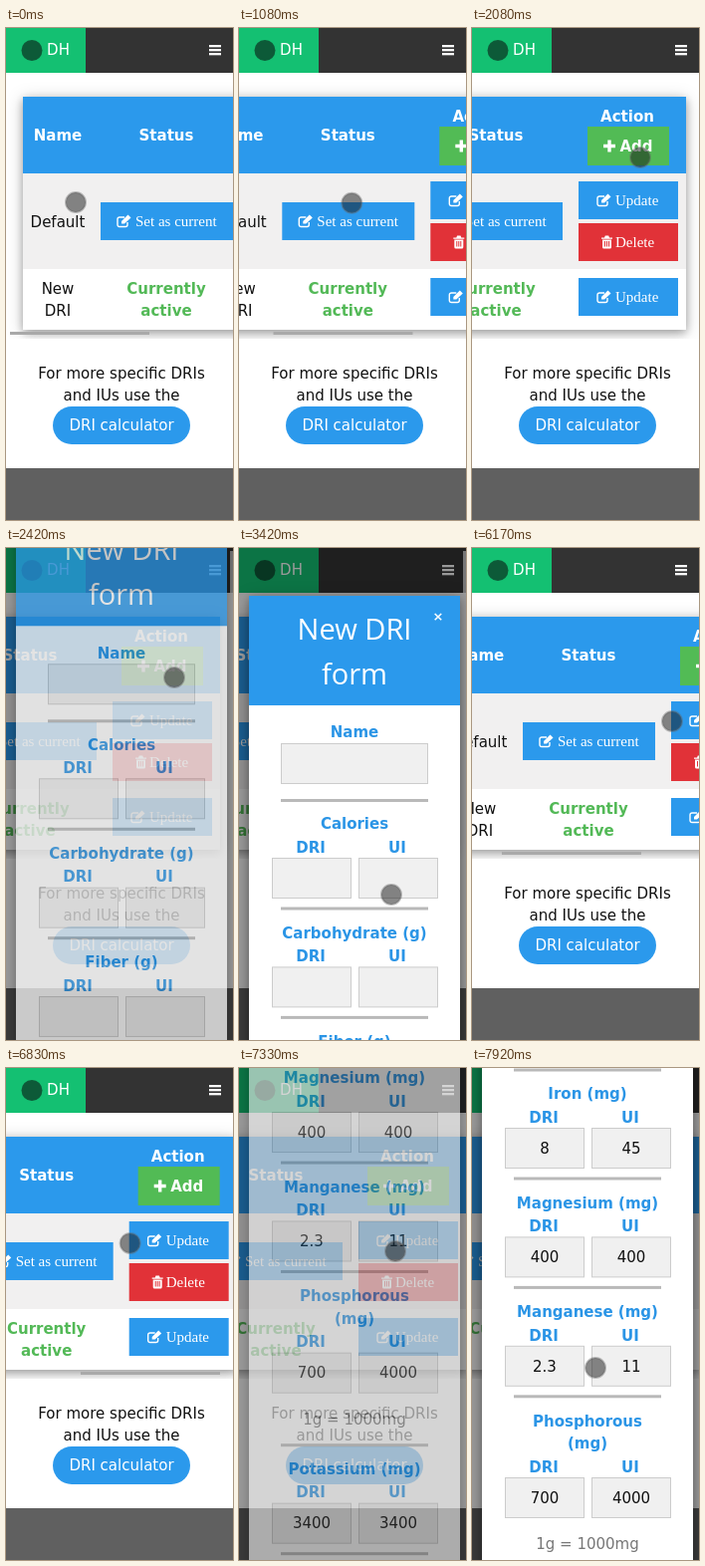
An HTML page for the animation above (8 s loop, 228x494 px).

```html
<!DOCTYPE html>
<html lang="en">
<head>
<meta charset="utf-8">
<title>DRI table</title>
<style>
  html, body { margin: 0; width: 100%; height: 100%; overflow: hidden; background: #fff; }
  svg { display: block; width: 100vw; height: 100vh; }
  text { font: 15px "DejaVu Sans", sans-serif; fill: #111; text-anchor: middle; }
  .bold { font-weight: bold; }
  .white { fill: #fff; }
  .blue { fill: #2b95e6; }
  .green { fill: #53b957; }
  .gray { fill: #777; }
  .button { font-family: "Liberation Serif", serif; fill: #fff; text-anchor: start; }
  .heading { font: 29px "Open Sans", sans-serif; fill: #fff; }
  .close { font-size: 13px; font-weight: bold; fill: #fff; }
  .card { filter: drop-shadow(0 3px 4px rgba(0,0,0,.28)) drop-shadow(0 2px 8px rgba(0,0,0,.2)); }
</style>
</head>
<body>
<svg id="stage" viewBox="0 0 228 494" preserveAspectRatio="none"></svg>
<script>
const BLUE = '#2b99ec', GREEN = '#52bb55', RED = '#e13238';

// Markup helpers; text is placed by its vertical centre.
const box = (x, y, w, h, fill, extra = '') =>
  `<rect x="${x}" y="${y}" width="${w}" height="${h}" fill="${fill}" ${extra}/>`;
const text = (x, y, str, cls = '', drop = 5.3) =>
  `<text x="${x}" y="${y + drop}" class="${cls}">${str}</text>`;
const at = (x, y, inner) => `<g transform="translate(${x} ${y})">${inner}</g>`;

const editIcon = `<path d="M11 7.5V10a2 2 0 0 1-2 2H3a2 2 0 0 1-2-2V4.500a2 2 0 0 1 2-2H8"
  fill="none" stroke="#fff" stroke-width="1.4"/><path d="M5 9V6.500L11.500 0 14.500 3 8 9Z" fill="#fff"/>`;
const trashIcon = `<path d="M0 2h3l.8-2h3.400l.8 2h3v1.300H0ZM1 4h9v7.500q0 1.500-1.500 1.500h-6Q1 13 1 11.500Z" fill="#fff"/>
  <path d="M3.500 5.500v5.500M5.500 5.500v5.500M7.500 5.500v5.500" stroke="${RED}"/>`;
const plusIcon = '<path d="M6 0v12M0 6h12" stroke="#fff" stroke-width="3.4"/>';

const button = (x, y, w, label, icon, fill, labelX, iconX) =>
  box(x, y, w, 38, fill) + at(iconX, y + 12.5, icon) + text(labelX, y + 19, label, 'button');
const updateButton = y => button(244, y, 100, 'Update', editIcon, BLUE, 281, 262);

const table =
  box(17, 69, 335, 234, '#fff', 'class="card"') +
  box(17, 69, 335, 77, BLUE) + box(17, 146, 335, 96, '#f1f0f0') +
  text(52, 108, 'Name', 'bold white') + text(161, 108, 'Status', 'bold white') +
  text(293, 89, 'Action', 'bold white') +
  box(253, 99, 82, 39, GREEN) + at(269, 112.5, plusIcon) + text(302, 118.5, 'Add', 'bold white') +
  text(52, 195, 'Default') +
  button(95, 175, 133, 'Set as current', editIcon, BLUE, 130, 111) +
  updateButton(154) + button(244, 196, 100, 'Delete', trashIcon, RED, 281, 267) +
  text(52, 262, 'New') + text(52, 284, 'DRI') +
  text(161, 262, 'Currently', 'bold green') + text(161, 284, 'active', 'bold green') +
  updateButton(251);

const page =
  box(0, 0, 228, 494, '#fff') + box(0, 0, 228, 45, '#333') + box(0, 0, 80, 45, '#14c072') +
  '<circle cx="26" cy="22.5" r="10.5" fill="#0d5a38"/>' + text(52.5, 22, 'DH', 'white') +
  [17, 21, 25].map(y => box(204, y, 12, 2.3, '#fff')).join('') +
  `<clipPath id="view"><rect y="53" width="228" height="259"/></clipPath>
   <g clip-path="url(#view)"><g id="table">${table}</g></g>` +
  box(4, 305, 140, 3, '#a9a9a9', 'id="thumb"') +
  text(116, 347, 'For more specific DRIs') + text(116, 369, 'and IUs use the') +
  box(47, 380, 138, 38, BLUE, 'rx="19"') + text(116, 399, 'DRI calculator', 'white') +
  box(0, 442, 228, 52, '#606060');

const rule = y => box(42, y - 1.5, 148, 3, '#b9b9b9');
const input = (x, y, w, value = '') =>
  box(x + .5, y + .5, w - 1, 40, '#f0f0f0', 'stroke="#ccc"') + text(x + w / 2, y + 20.5, value);
const nutrient = (y, title, dri, ui) =>
  text(116, y, title, 'bold blue') +
  text(72, y + 23.5, 'DRI', 'bold blue') + text(159, y + 23.5, 'UI', 'bold blue') +
  input(33, y + 34, 80, dri) + input(120, y + 34, 80, ui);
const series = (y, rows) => rows.map(([title, dri, ui], i) =>
  nutrient(y + i * 109.4, title, dri, ui) + rule(y + i * 109.4 + 85)).join('');

const newForm =
  box(10, 48, 212, 1200, '#fff', 'class="card"') + box(10, 48, 212, 110, BLUE) +
  text(116, 81, 'New DRI', 'heading', 11) + text(116, 126, 'form', 'heading', 11) +
  text(200, 68, '×', 'close', 5) +
  text(116, 185, 'Name', 'bold blue') + input(42, 196, 148) + rule(253.5) +
  series(277, [['Calories'], ['Carbohydrate (g)'], ['Fiber (g)'], ['Fat (g)'], ['Protein (g)']]);

const updateForm =
  box(10, -100, 212, 1200, '#fff', 'class="card"') + rule(2) +
  series(26, [['Iron (mg)', 8, 45], ['Magnesium (mg)', 400, 400], ['Manganese (mg)', 2.3, 11]]) +
  text(116, 354.5, 'Phosphorous', 'bold blue') + nutrient(377, '(mg)', 700, 4000) +
  text(116, 478, '1g = 1000mg', 'gray') + rule(504) +
  series(528, [['Potassium (mg)', 3400, 3400], ['Selenium (µg)', 55, 400], ['Sodium (mg)', 1500, 2300]]);

const $ = id => document.getElementById(id);
$('stage').innerHTML = page +
  box(0, 0, 228, 494, 'rgba(0,0,0,.4)', 'id="dim"') +
  box(225, 3, 3, 42, '#777', 'id="formThumb"') +
  `<g id="newForm">${newForm}</g><g id="updateForm">${updateForm}</g>
   <circle id="cursor" r="10" fill="rgba(20,20,20,.5)" stroke="rgba(100,100,100,.4)" stroke-width="2"/>`;

const LOOP = 8000, MAX_SCROLL = 137;
const cursorPath = [
  [0, 70, 175], [600, 168, 178], [750, 165, 178], [1550, 26, 172], [1700, 22, 166],
  [2060, 169, 130], [2450, 169, 130], [3000, 166, 220], [3420, 153, 348], [3550, 153, 352],
  [3830, 185, 124], [4050, 200, 68], [4350, 200, 68], [5000, 112, 175], [5400, 108, 175],
  [6170, 201, 174], [6350, 206, 174], [6900, 121, 176], [7150, 157, 184], [7400, 157, 184],
  [7900, 124, 301], [8000, 124, 301]];
const thumbFade = [
  [0, 1], [250, 1], [450, 0], [720, 0], [760, 1], [1780, 1], [2040, 0],
  [5400, 0], [5450, 1], [7000, 1], [7180, 0], [8000, 0]];

const clamp = (v, lo, hi) => Math.min(hi, Math.max(lo, v));

function sample(keys, t) {
  const i = Math.max(1, keys.findIndex(k => k[0] > t));
  const a = keys[i - 1], b = keys[i];
  const p = (t - a[0]) / (b[0] - a[0]), e = p * p * (3 - 2 * p);
  return a.slice(1).map((v, j) => v + (b[j + 1] - v) * e);
}

// The table follows the finger during the two drags.
function tableScroll(t, x) {
  if (t < 750) return 0;
  if (t < 1700) return clamp(165 - x, 0, MAX_SCROLL);
  if (t < 5400) return MAX_SCROLL;
  if (t < 6900) return clamp(245 - x, 0, MAX_SCROLL);
  return 124;
}

// Forms drop in from 300px above while fading in.
function showForm(id, t, open, close) {
  const shown = t >= open && t < close;
  const p = 1 - (1 - clamp((t - open) / 400, 0, 1)) ** 2.2;
  $(id).style.display = shown ? '' : 'none';
  $(id).style.opacity = p;
  $(id).setAttribute('transform', `translate(0 ${-300 * (1 - p)})`);
  return shown;
}

function draw() {
  const t = performance.now() % LOOP;
  const [x, y] = sample(cursorPath, t);
  const scroll = tableScroll(t, x);
  $('cursor').setAttribute('transform', `translate(${x} ${y})`);
  $('table').setAttribute('transform', `translate(${-scroll} 0)`);
  $('thumb').setAttribute('x', 4 + scroll * .59);
  $('thumb').style.opacity = sample(thumbFade, t)[0];
  const adding = showForm('newForm', t, 2240, 4250);
  const updating = showForm('updateForm', t, 7200, LOOP);
  $('dim').style.display = adding || updating ? '' : 'none';
  $('formThumb').style.display = adding ? '' : 'none';
  requestAnimationFrame(draw);
}
draw();
</script>
</body>
</html>
```
